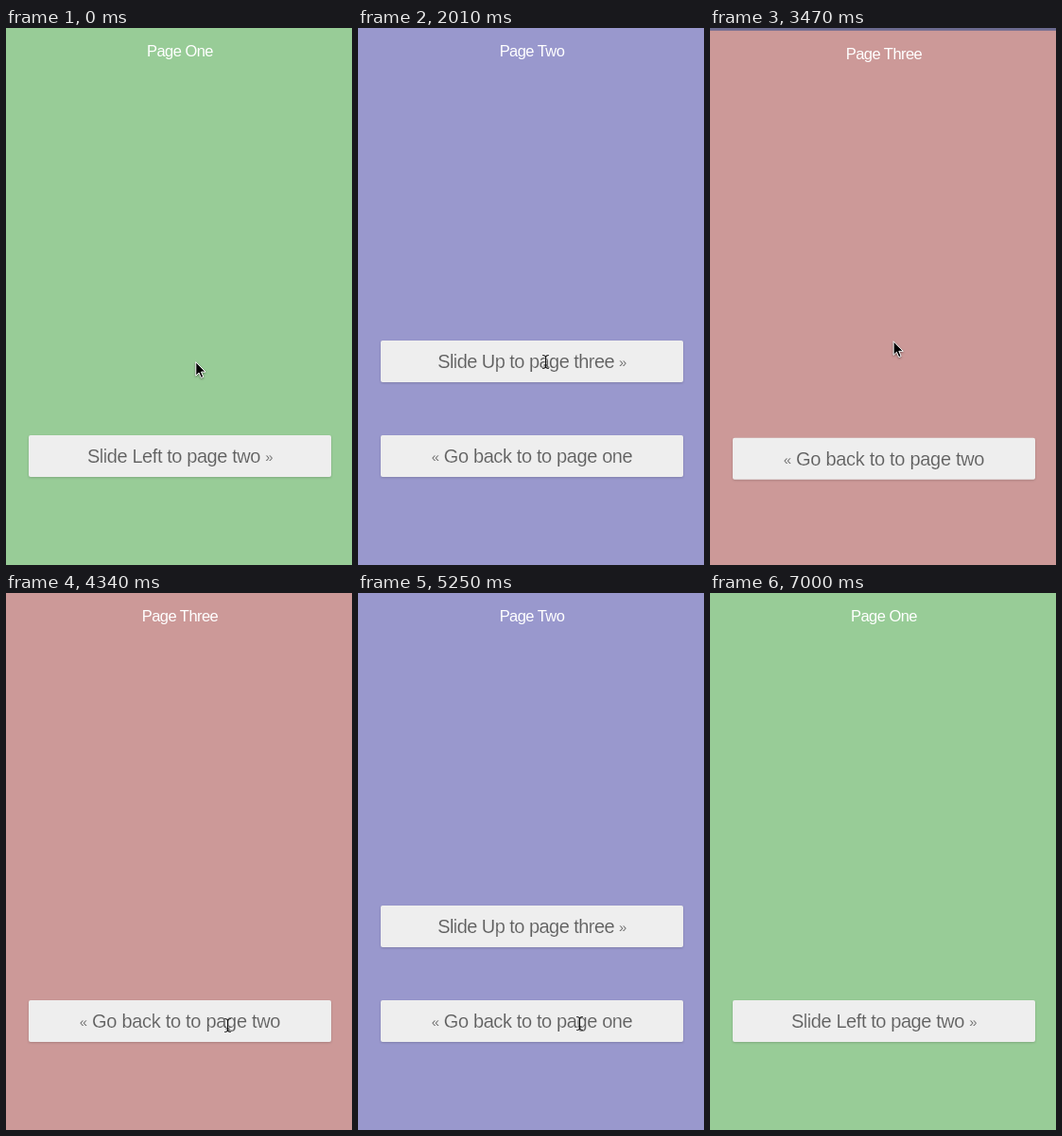
Recreate the animation shown at these times as an HTML page. Size 366 px wide and 567 px high, loop 7590 ms.

```html
<!DOCTYPE html>
<html lang="en">
<head>
<meta charset="utf-8">
<title>Page transitions</title>
<style>
  html, body { margin: 0; width: 100%; height: 100%; overflow: hidden; background: #000; }
  svg { display: block; width: 100vw; height: 100vh; }
  text { font-family: "Liberation Sans", Arial, Helvetica, sans-serif; text-anchor: middle; }
  .title { font-size: 16.5px; letter-spacing: -.55px; fill: #fff; }
  .label { font-size: 20px; fill: #5e5e5e; stroke: #eee; stroke-width: .18px; }
  .chevron { font-size: 15px; baseline-shift: 1.5px; }
  .button { fill: #eee; filter: drop-shadow(0 1.5px 1px rgba(0, 0, 0, .17)); }
  #arrow { filter: drop-shadow(0 1px 1px rgba(0, 0, 0, .4)); }
</style>
</head>
<body>
<svg viewBox="0 0 366 567">
  <g id="pages"></g>
  <g id="pointer">
    <path id="arrow" transform="translate(-1.2 -1.4)" stroke="#fff"
      d="M0 0V14.6L3.3 11.4 5.6 16.8 8 15.8 5.7 10.5H10.2Z"/>
    <g id="beam" fill="none">
      <path stroke="#fff" stroke-opacity=".55" stroke-width="2.2"/>
      <path stroke="#111" stroke-width="1.1"/>
    </g>
  </g>
</svg>
<script>
const W = 366, H = 567, LOOP = 7590;
const SLIDE = 400;      // length of a page slide
const STEP = 58;        // refresh interval while something moves
const PARALLAX = .207;  // share of the slide followed by the lower page
const $ = id => document.getElementById(id);

const PAGES = [
  { title: "Page One", color: "#98cc97", buttons: [["Slide Left to page two »", 430, -.42]] },
  { title: "Page Two", color: "#9998cd", buttons: [
    ["Slide Up to page three »", 330, -.55],
    ["« Go back to to page one", 430, -.38]] },
  { title: "Page Three", color: "#cc9998", buttons: [["« Go back to to page two", 430, -.3]] }];

// Each move: when it runs and where the pointer ends; a click sets off a slide
const MOVES = [
  { from: 720, to: 1150, x: 243.5, y: 454.5 },
  { from: 1560, to: 2010, x: 198.5, y: 352.5, click: true },
  { from: 3180, to: 3650, x: 185, y: 266, click: true },
  { from: 3800, to: 3920, x: 231, y: 397 },
  { from: 4100, to: 4340, x: 234.5, y: 456.5 },
  { from: 4810, to: 5250, x: 234.5, y: 454.5, click: true },
  { from: 6060, to: 6530, x: 234.5, y: 454.5, click: true },
  { from: 6800, to: 7000, x: 293, y: 555 }];
const START = { from: 0, to: 0, x: 202, y: 354 };
const GONE = 7000;

function add(parent, tag, attrs, text) {
  const el = document.createElementNS("http://www.w3.org/2000/svg", tag);
  for (const key in attrs) el.setAttribute(key, attrs[key]);
  if (text) el.textContent = text;
  return parent.appendChild(el);
}

function buildPage({ title, color, buttons }) {
  const group = add($("pages"), "g", {});
  add(group, "rect", { width: W, height: H, fill: color });
  add(group, "text", { class: "title", x: 184, y: 30 }, title);
  for (const [label, y, spacing] of buttons) {
    add(group, "rect", { class: "button", x: 24, y, width: 320, height: 44, rx: 2 });
    const text = add(group, "text", { class: "label", x: 184, y: y + 29, "letter-spacing": spacing });
    for (const part of label.split(/([«»])/).filter(Boolean))
      add(text, "tspan", /[«»]/.test(part) ? { class: "chevron" } : {}, part);
  }
  const shade = add(group, "rect", { width: W, height: H, opacity: 0 });
  return { group, shade };
}

const [one, two, three] = PAGES.map(buildPage);
for (const line of $("beam").children)
  line.setAttribute("d", "M-3.3 -7Q0 -7 0 -4.5Q0 -7 3.3 -7M0 -5V5M-3.3 7Q0 7 0 4.5Q0 7 3.3 7M-2 3.5H2");

// cubic-bezier(0, 0, .58, 1), solved by bisection
function easeOut(x) {
  if (x <= 0) return 0;
  if (x >= 1) return 1;
  let lo = 0, hi = 1;
  for (let i = 0; i < 24; i++) {
    const s = (lo + hi) / 2;
    if (1.74 * (1 - s) * s * s + s ** 3 < x) lo = s; else hi = s;
  }
  return 3 * (1 - lo) * lo * lo + lo ** 3;
}

// How far an upper page covers the one below, and how dark that one gets
function cover(t, enter, leave) {
  const leaving = t >= leave;
  const amount = leaving ? 1 - easeOut((t - leave) / SLIDE) : easeOut((t - enter) / SLIDE);
  const dim = leaving ? .33 * amount : .3 * (1 - (1 - amount) ** 1.9);
  return { amount, dim };
}

// Snap the time to the refresh steps of the current move
function snap(time, { from, to }) {
  return time >= to ? to : from + Math.floor((time - from) / STEP) * STEP;
}

// The pointer lingers after a click; otherwise it is already moving at the first step
function progress(t, { from, to, click }) {
  if (t >= to) return 1;
  return click ? ((t - from) / (to - from)) ** 3 : (t - from + STEP) / (to - from + STEP);
}

const place = (el, x, y) => el.setAttribute("transform", `translate(${x} ${y})`);
const show = (el, on) => el.setAttribute("visibility", on ? "visible" : "hidden");

function draw(time) {
  const index = MOVES.findLastIndex(m => m.from <= time);
  const move = MOVES[index] || START;
  const last = MOVES[index - 1] || START;
  const t = snap(time, move);

  const side = cover(t, 1490, 5962);
  place(one.group, -side.amount * W * PARALLAX, 0);
  place(two.group, (1 - side.amount) * W, 0);
  one.shade.setAttribute("opacity", side.dim);

  const rise = cover(t, 3091, 4687);
  place(three.group, 0, (1 - rise.amount) * H);
  two.shade.setAttribute("opacity", rise.dim);

  const k = progress(t, move);
  const x = last.x + (move.x - last.x) * k;
  const y = last.y + (move.y - last.y) * k;
  place($("pointer"), x, y);

  // Over a label the pointer is a text beam, except while pages slide
  const page = PAGES[rise.amount > .5 ? 2 : side.amount > .5 ? 1 : 0];
  const overLabel = page.buttons.some(([, top]) => Math.abs(x - 184) < 100 && Math.abs(y - top - 22) < 12);
  const beam = overLabel && !(move.click && k > 0 && k < 1);
  show($("arrow"), t < GONE && !beam);
  show($("beam"), t < GONE && beam);
}

const begin = performance.now();
function loop() {
  draw((performance.now() - begin) % LOOP);
  requestAnimationFrame(loop);
}
loop();
</script>
</body>
</html>
```
